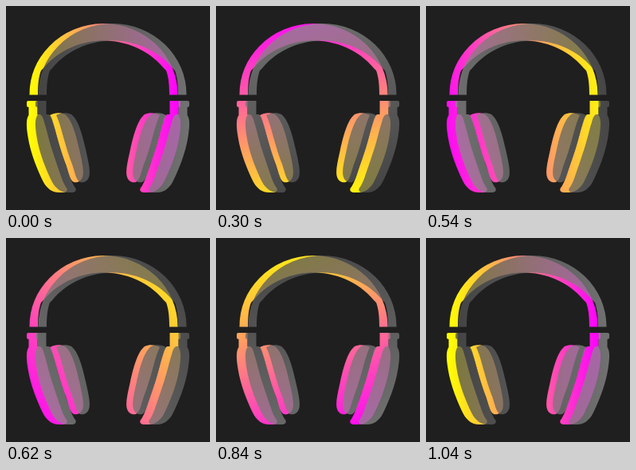
An HTML page for the animation above (1060 ms loop, 256 px wide and 256 px high).

```html
<!DOCTYPE html>
<html lang="en">
<head>
<meta charset="utf-8">
<title>Headphones</title>
<style>
  html, body { margin: 0; width: 100%; height: 100%; overflow: hidden; background: #1f1f1f; }
  svg { display: block; width: 100vw; height: 100vh; }
</style>
</head>
<body>
<svg viewBox="0 0 256 256">
  <defs>
    <linearGradient id="neon" gradientUnits="userSpaceOnUse">
      <stop offset="0" stop-color="#ff0"/>
      <stop offset="1" stop-color="#f0f"/>
    </linearGradient>
    <linearGradient id="grey" gradientUnits="userSpaceOnUse">
      <stop offset="0" stop-color="#505050"/>
      <stop offset="1" stop-color="#8c8c8c"/>
    </linearGradient>
    <!-- Left half of the band, yoke and cup -->
    <path id="frame" d="
      M29.500 111.500V111A93 89 0 0 1 122.500 22H123V43.500H122.500C96 43.500 67 54 47.500 77.500L44 81C41 89 40 99 40 111.500Z
      M28.500 127V137C25 142 25.500 151 27.500 164C31 186 40 207 47 221C52 230 59 234 66 234H73
      C77 233 78 230 75 227C72 222 70 217 68.500 212C65 202 61 190 58 181C54 169 51 155 48 146
      C47 141 45 136.500 42 136H39.500V119H28Q26 119 26 121V125Q26 127 28.500 127Z"/>
    <path id="pad" d="
      M55 137C60 134 68 133 74 136C83 143 88 162 92 180C95 194 98 205 96.500 213C95 220 90 222 85 221
      C80 218 79 211 75.500 200C71 189 68 178 65 168C62 157 59 145 55 137Z"/>
    <clipPath id="frames">
      <use href="#frame"/>
      <use href="#frame" transform="matrix(-1 0 0 1 245 0)"/>
    </clipPath>
    <clipPath id="pads">
      <use href="#pad"/>
      <use href="#pad" transform="matrix(-1 0 0 1 248 0)"/>
    </clipPath>
  </defs>
  <rect width="256" height="256" fill="#1f1f1f"/>
  <g fill="url(#neon)">
    <rect width="256" height="256" clip-path="url(#pads)"/>
    <rect width="256" height="256" clip-path="url(#frames)"/>
  </g>
  <g fill="url(#grey)" fill-opacity=".75">
    <rect width="256" height="256" clip-path="url(#pads)" transform="translate(8 0)"/>
    <rect width="256" height="256" clip-path="url(#frames)" transform="translate(11 0)"/>
  </g>
</svg>
<script>
  const LOOP = 1060, STEP = 20, TURN = 1040;
  const CENTER = { x: 122.5, y: 128 }, HALF = { w: 95, h: 106 };
  const gradients = document.querySelectorAll('linearGradient');

  // The gradient line turns anticlockwise and always reaches the box corners.
  function render(time) {
    const moment = Math.floor((time % LOOP) / STEP) * STEP;
    const angle = 2 * Math.PI * moment / TURN;
    const cos = Math.cos(angle), sin = Math.sin(angle);
    const reach = Math.abs(cos) * HALF.w + Math.abs(sin) * HALF.h;
    const dx = cos * reach, dy = -sin * reach;
    for (const gradient of gradients) {
      gradient.setAttribute('x1', CENTER.x - dx);
      gradient.setAttribute('y1', CENTER.y - dy);
      gradient.setAttribute('x2', CENTER.x + dx);
      gradient.setAttribute('y2', CENTER.y + dy);
    }
  }

  const start = performance.now();
  function tick() {
    render(performance.now() - start);
    requestAnimationFrame(tick);
  }
  tick();
</script>
</body>
</html>
```
